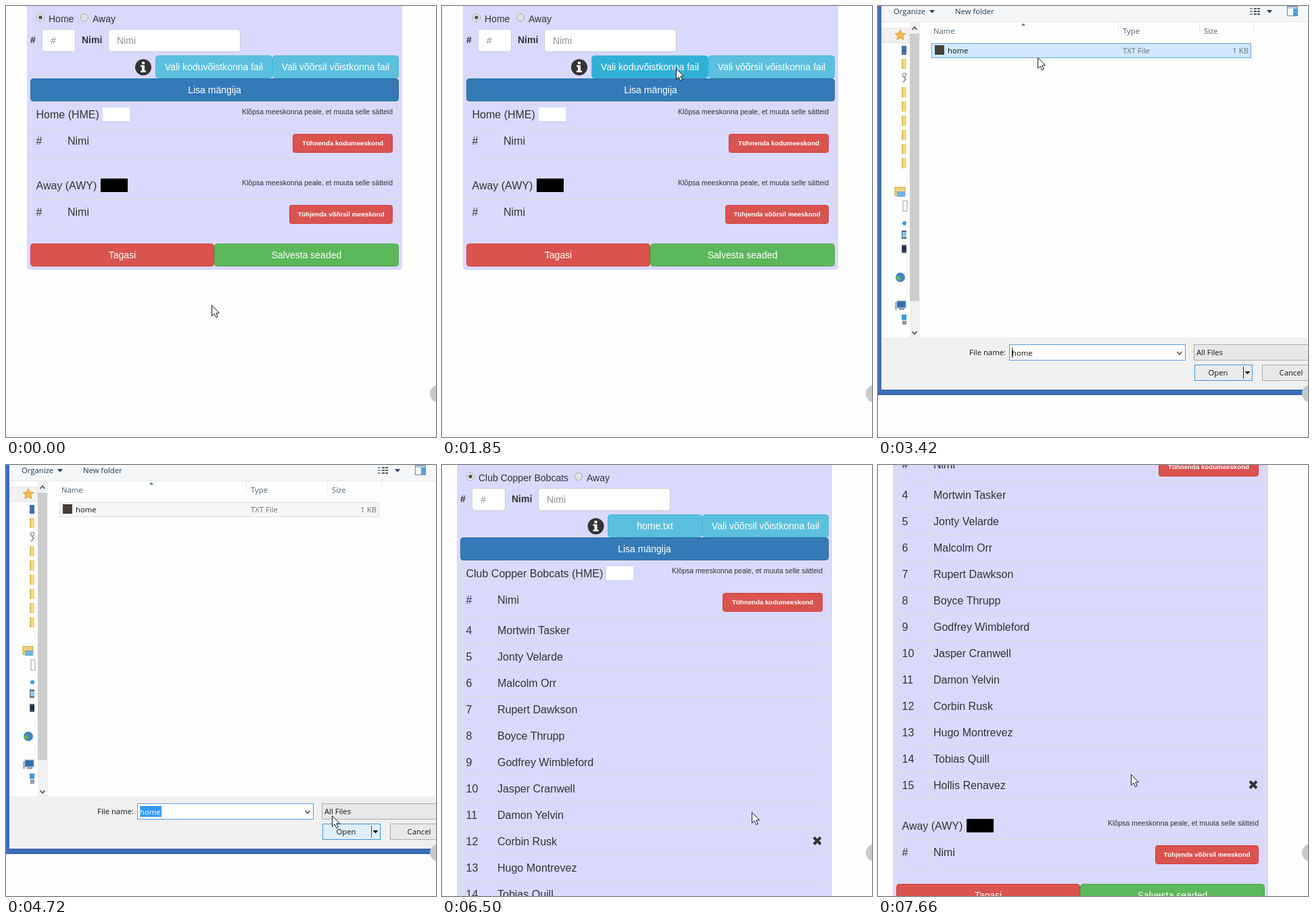
Write an HTML page that moves like this. It is 636x637 px and loops after 8000 ms.

```html
<!DOCTYPE html>
<html lang="et">
<head>
<meta charset="utf-8">
<title>Team settings</title>
<style>
html, body { margin: 0; width: 100%; height: 100%; overflow: hidden; background: #fefefe; }
svg { position: absolute; left: 0; top: 0; width: 636px; height: 637px; overflow: visible; }
#page { font: 14px "Liberation Sans", Arial, sans-serif; }
#dialog { font: 11.3px "Open Sans", "Noto Sans", sans-serif; transform-origin: 300px 270px; }
text { white-space: pre; }
</style>
</head>
<body>
<svg id="page"></svg>
<svg id="dialog"></svg>
<svg id="top">
  <circle cx="640" cy="573" r="13" fill="#c9c9c9"/>
  <path id="cursor" d="M.5 .5V16.2L4.1 12.8 6.6 18.5 9.2 17.4 6.8 11.9H11.5Z" fill="#fff" stroke="#15152e"/>
</svg>
<script>
const LOOP = 8000;
const $ = id => document.getElementById(id);
const clamp = v => Math.max(0, Math.min(1, v));

// Progress in n hard steps, the first at a and the last at b.
const steps = (t, a, b, n) =>
  t < a ? 0 : Math.min(n, Math.floor((t - a) / (b - a) * (n - 1) + 1e-6) + 1) / n;

// ---- drawing helpers ----
const rect = (x, y, w, h, fill, more = '') =>
  `<rect x="${x}" y="${y}" width="${w}" height="${h}" fill="${fill}" ${more}/>`;
const frame = (x, y, w, h, fill, line, r = 0) =>
  rect(x + .5, y + .5, w - 1, h - 1, fill, `stroke="${line}" rx="${r}"`);
const text = (x, y, s, fill = '#333', more = '') =>
  `<text x="${x}" y="${y}" fill="${fill}" ${more}>${s}</text>`;
const path = (d, fill, more = '') => `<path d="${d}" fill="${fill}" ${more}/>`;
const circle = (x, y, r, fill, more = '') =>
  `<circle cx="${x}" cy="${y}" r="${r}" fill="${fill}" ${more}/>`;
const stroke = (d, color, w = 1) => path(d, 'none', `stroke="${color}" stroke-width="${w}"`);
const MID = 'text-anchor="middle"', END = 'text-anchor="end"';
const BIG = 'font-size="16"', BOLD = 'font-weight="700"';

// ---- the web page ----
const TEAM = 'Club Copper Bobcats';
const PLAYERS = ['Mortwin Tasker', 'Jonty Velarde', 'Malcolm Orr', 'Rupert Dawkson',
  'Boyce Thrupp', 'Godfrey Wimbleford', 'Jasper Cranwell', 'Damon Yelvin',
  'Corbin Rusk', 'Hugo Montrevez', 'Tobias Quill', 'Hollis Renavez'];
const KINDS = { // fill, border, hover
  info: ['#5bc0de', '#46b8da', '#31b0d5'],
  primary: ['#337ab7', '#2e6da4', '#286090'],
  danger: ['#d9534f', '#d43f3a', '#c9302c'],
  success: ['#5cb85c', '#4cae4c', '#449d44']
};
const LINE = '#ddd';

function drawPage({ loaded, scroll, hoverRow, pressed, x: cx, y: cy }) {
  const dx = loaded ? -9 : 0;
  const extra = loaded ? 39 * PLAYERS.length : 0;

  const button = (x, y, w, h, kind, label, small) => {
    const [fill, border, hover] = KINDS[kind];
    const px = cx - dx, py = cy + scroll;
    const over = px >= x && px < x + w && py >= y && py < y + h;
    return frame(x, y, w, h, over ? (pressed ? '#269abc' : hover) : fill, border, small ? 3 : 4) +
      text(x + w / 2, y + (small ? 17 : 22), label, '#fff', MID + (small ? ` font-size="9.7" ${BOLD}` : ''));
  };
  const radio = (x, label, on) =>
    circle(x, 17, 5.5, on ? '#f0f0f0' : '#e2e2e2', 'stroke="#a6a6a6"') +
    (on ? circle(x, 17, 2.8, '#555') : '') + text(x + 12, 24, label);
  const input = (x, w, label) =>
    frame(x, 34, w, 34, '#fff', '#ccc', 4) + text(x + 13, 56, label, '#8f8f97');
  const hline = y => rect(36, y, 545, 1, LINE);
  const vline = (x, y, h) => rect(x, y, 1, h, LINE);
  const team = (y, rows, name, boxX, color, btnX, label) =>
    text(44.5, y + 25, name, '#333', BIG) + rect(boxX, y + 9, 40, 20, color) +
    text(572, y + 19, 'Klõpsa meeskonna peale, et muuta selle sätteid', '#333', 'font-size="10.5" ' + END) +
    hline(y) + hline(y + 39) + hline(y + 84) +
    vline(36, y, 84 + rows) + vline(580, y, 84 + rows) + vline(83, y + 39, 45 + rows) +
    text(44.5, y + 64, '#', '#333', BIG) + text(91, y + 64, 'Nimi', '#333', BIG) +
    button(btnX, y + 48, 572 - btnX, 28, 'danger', label, true);
  const player = (name, i) => {
    const y = 250 + 39 * i;
    return text(44.5, y, i + 4, '#333', BIG) + text(91, y, name, '#333', BIG) + hline(y + 14) +
      (i === hoverRow ? stroke(`M559 ${y - 1.5}l10 -10m0 10l-10 -10`, '#333', 4) : '');
  };
  const ix = loaded ? 236.5 : 203, split = loaded ? 254 : 221;

  return `<g transform="translate(${dx} ${-scroll})">` +
    rect(31, -10, 555, 400 + extra, '#d9d9fe', 'rx="5"') +
    radio(51, loaded ? TEAM : 'Home', true) + radio(loaded ? 211 : 116, 'Away') +
    text(36, 55, '#', '#333', BOLD) + input(53, 50, '#') +
    text(112, 55, 'Nimi', '#333', BOLD) + input(151, 196, 'Nimi') +
    circle(ix, 90.5, 12, '#333') +
    path(`M${ix - 2} 82.5h4v3.5h-4zM${ix - 4} 87.5h6v8h2v2.5h-8v-2.5h2v-5.5h-2z`, '#fff') +
    button(split, 73, 394 - split, 34, 'info', loaded ? 'home.txt' : 'Vali koduvõistkonna fail') +
    button(394, 73, 187, 34, 'info', 'Vali võõrsil võistkonna fail') +
    team(141, extra, (loaded ? TEAM : 'Home') + ' (HME)', loaded ? 252 : 143, '#fff', 424, 'Tühnenda kodumeeskond') +
    button(36, 107, 545, 34, 'primary', 'Lisa mängija') +
    (loaded ? PLAYERS.map(player).join('') : '') +
    team(246 + extra, 0, 'Away (AWY)', 140, '#000', 419, 'Tühjenda võõrsil meeskond') +
    button(36, 351 + extra, 272, 34, 'danger', 'Tagasi') +
    button(308, 351 + extra, 273, 34, 'success', 'Salvesta seaded') + '</g>';
}

// ---- the file dialog ----
const folder = y => rect(35, y - 7, 7, 15, '#f3d987') + rect(35, y - 7, 2, 15, '#e2bd5c');
const screen = (y, c) => rect(35, y - 6, 7, 12, '#55616d') + rect(36, y - 4, 6, 8, c);
const drop = (x, y, c) => path(`M${x - 4} ${y - 2}h8l-4 4.5z`, c);
const chevron = (x, y, d) => stroke(`M${x - 3.5} ${y - 2 * d}l3.5 ${4 * d}l3.5 ${-4 * d}`, '#555', 1.8);

const NAV = rect(6, 33, 41, 21, '#f1f1f1', 'stroke="#dedede"') +
  path('M33 35l2.3 5 5.7.6-4.2 3.8 1.2 5.6-5-2.9-5 2.9 1.2-5.6-4.2-3.8 5.7-.6z', '#f6b94a', 'stroke="#c98a2b" stroke-width=".7"') +
  rect(35, 59, 7, 13, '#3f6fae') + [85, 127, 148, 169, 190, 211, 232].map(folder).join('') +
  circle(39, 102, 3, '#ddd', 'stroke="#888"') + stroke('M38 105l3 3-4 5', '#999', 2) +
  rect(25, 268, 15, 12, '#f0cf72', 'stroke="#c9a54b"') + rect(28, 274, 12, 8, '#6fb3e0') +
  rect(37, 288, 6, 15, '#fff', 'stroke="#999"') + circle(39, 321, 3, '#3b9ad9') +
  screen(338, '#8fc6ec') + screen(359, '#22304a') +
  circle(33, 401, 7, '#3f86c4') + circle(30, 402, 3, '#6bb35a') +
  rect(28, 436, 13, 10, '#2f6fb5', 'stroke="#9aa5b0"') + rect(25, 438, 3, 11, '#a9b3bd') + rect(31, 447, 8, 2, '#889') +
  rect(35, 456, 7, 8, '#3a9be0') + rect(36, 465, 6, 6, '#8b98a5') +
  rect(47, 24, 15, 467, '#f0f0f0') + rect(47, 41, 14, 395, '#cdcdcd') +
  chevron(54, 33, -1) + chevron(54, 483, 1);

const CHROME = rect(-40, -40, 740, 615, '#3c6eb9') + rect(-40, 574, 740, 1, '#2c5591') +
  rect(5, -40, 690, 607, '#fefefe') + rect(5, -40, 690, 63, '#f5f6f7') + rect(5, 23, 690, 1, '#e6e8ea') +
  text(23, 12, 'Organize', '#1e395b') + drop(80, 8, '#1e395b') + text(114, 12, 'New folder', '#1e395b') +
  [3, 7, 11].map(y => rect(550, y, 4, 2, '#8a97a8') + rect(556, y, 4, 2, '#555') + rect(561, y, 4, 2, '#555')).join('') +
  drop(579, 8, '#1e395b') + rect(605.5, .5, 15, 14, '#fff', 'stroke="#6d87a8"') +
  rect(606, 1, 14, 3, '#b9cbe0') + rect(614, 4, 6, 10, '#4ba3e3') +
  NAV + text(82, 41, 'Name', '#4c607a') + text(362, 41, 'Type', '#4c607a') + text(482, 41, 'Size', '#4c607a') +
  [355, 475, 555].map(x => rect(x, 24, 1, 17, '#e3e8ee')).join('') + path('M212 29l3-3.5 3 3.5z', '#3f7fb5') +
  rect(5, 490, 690, 77, '#f0f0f0') + rect(5, 567, 690, 1, '#33609f') +
  text(189, 516, 'File name:', '#111', END) +
  frame(467, 500, 228, 24, '#e8e8e8', '#acacac') + text(471, 516, 'All Files', '#111') +
  frame(568, 530, 86, 24, '#e9e9e9', '#acacac') + text(611, 546, 'Cancel', '#111', MID);

function drawDialog({ row, field, hot, down }) {
  const rowLook = [null, ['#e5f3fb', '#70c0e7'], ['#d1e8ff', '#66a7e8'], ['#f7f7f7', '#dedede']][row];
  return CHROME +
    (rowLook ? frame(79, 55, 473, 22, ...rowLook) : '') +
    rect(84, 58, 14, 14, '#453f3c') + text(103, 70, 'home', '#111') +
    text(362, 70, 'TXT File', '#6d6d6d') + text(548, 70, '1 KB', '#6d6d6d', END) +
    frame(194, 500, 261, 24, '#fff', down ? '#a5b4c4' : '#569de5') + chevron(446, 513, 1) +
    (field === 2 ? rect(198, 504, 32, 16, '#3399ff') : rect(198, 505, 1, 15, '#111')) +
    (field ? text(198, 517, 'home', field === 2 ? '#fff' : '#111') : '') +
    frame(468, 530, 86, 24, down ? '#c4e0f7' : hot ? '#e0effb' : '#ebebeb', '#3c94e0') +
    rect(540, 533, 1, 18, hot ? '#4b5560' : '#222') + drop(546.5, 542, '#111') +
    text(503, 546, 'Open', '#111', MID);
}

// ---- motion ----
const MOVES = [ // start, end, steps, x, y
  [560, 1230, 9, 346, 97], [1770, 1850, 2, 346, 92], [3010, 3270, 4, 236, 76],
  [3910, 4420, 7, 549, 556], [4500, 4640, 3, 471, 507], [4720, 4940, 4, 509, 546],
  [6500, 6670, 3, 374, 457]
];

function cursorAt(t) {
  let x = 304, y = 442;
  for (const [a, b, n, toX, toY] of MOVES) {
    const p = steps(t, a, b, n) ** .89;
    x += (toX - x) * p;
    y += (toY - y) * p;
  }
  return { x: Math.round(x), y: Math.round(y) };
}

const shown = {};
function put(id, html) {
  if (shown[id] !== html) $(id).innerHTML = shown[id] = html;
}

function render(t) {
  const tip = cursorAt(t);
  const roll = steps(t, 7060, 7660, 9);
  put('page', drawPage({
    ...tip,
    loaded: t >= 5730,
    pressed: t >= 1770 && t < 1850,
    scroll: Math.round(200 * (1 - (1 - roll) ** 1.64)),
    hoverRow: roll === 1 ? 11 : t >= 6670 ? 5 : 8
  }));

  const open = steps(t, 2480, 2730, 4);
  const close = clamp(steps(t, 5350, 5730, 6) * 2 - 1);
  const tilt = t < 5350 ? 1 - open : close;
  const style = $('dialog').style;
  style.opacity = open * (1 - close ** 1.5);
  style.visibility = open && close < 1 ? 'visible' : 'hidden';
  style.transform = tilt ? `perspective(1000px) scale(${1 - .027 * tilt}) rotateX(${4.2 * tilt}deg)` : 'none';
  put('dialog', drawDialog({
    row: t >= 3500 ? 3 : t >= 3270 ? 2 : t >= 3180 ? 1 : 0,
    field: t >= 3670 ? 2 : t >= 3270 ? 1 : 0,
    hot: t >= 4500,
    down: t >= 5350
  }));

  $('cursor').setAttribute('transform', `translate(${tip.x} ${tip.y})`);
}

const start = performance.now();
function tick() {
  render((performance.now() - start) % LOOP);
  requestAnimationFrame(tick);
}
tick();
</script>
</body>
</html>
```
